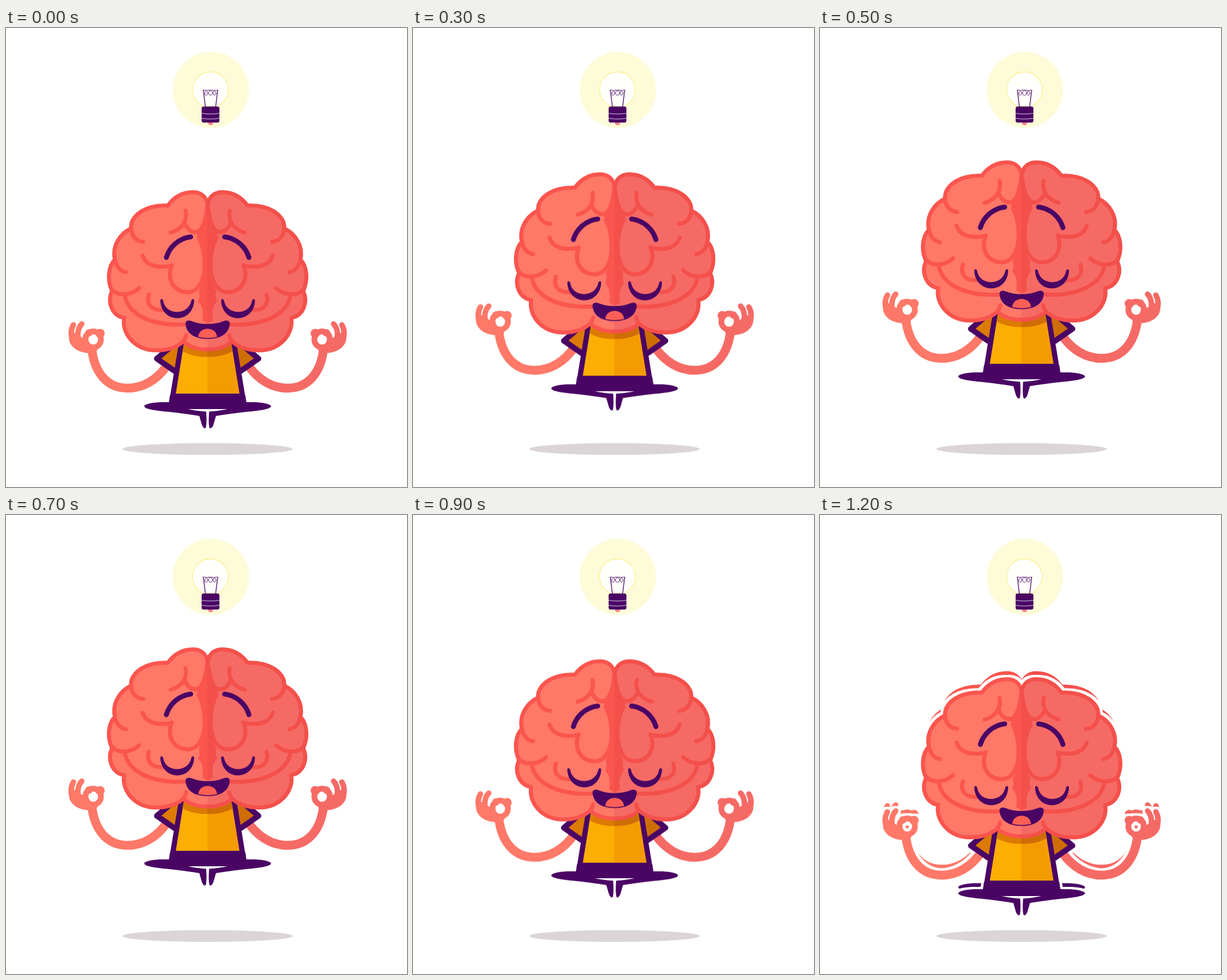
Write an HTML page that moves like this. It is 699 by 801 pixels and loops after 1300 ms.

```html
<!DOCTYPE html>
<html lang="en">
<head>
<meta charset="utf-8">
<title>Meditating brain</title>
<style>
  html, body { margin: 0; width: 100%; height: 100%; overflow: hidden; background: #fff; }
  svg { display: block; width: 699px; height: 801px; }

  .left  { --skin: #ff7868; --line: #fa554e; --shirt: #fcae02; --shade: #dc7a02; }
  .right { --skin: #f66a65; --line: #f4504b; --shirt: #f59b02; --shade: #cf6d05; }

  .skin  { fill: var(--skin); }
  .limb  { fill: none; stroke: var(--skin); stroke-linecap: round; }
  .fold  { fill: none; stroke: var(--line); stroke-width: 7; stroke-linecap: round; stroke-linejoin: round; }
  .ink   { fill: #4a0564; }
  .inkline { fill: none; stroke: #4a0564; stroke-linecap: round; stroke-linejoin: round; }

  /* 13 held poses of 100 ms: seven up, six down */
  .float { animation: float 1300ms infinite; }
  @keyframes float {
    0%       { transform: translateY(0); animation-timing-function: steps(7, end); }
    53.8461% { transform: translateY(-72.8px); animation-timing-function: step-end; }
    53.8462% { transform: translateY(-52px); animation-timing-function: steps(6, end); }
    100%     { transform: translateY(10.4px); }
  }

  /* trace of the previous pose, seen only while the last one is held */
  .trace { opacity: 0; animation: trace 1300ms step-end infinite; }
  @keyframes trace {
    0%       { opacity: 0; }
    92.3077% { opacity: 1; }
    100%     { opacity: 1; }
  }
</style>
</head>
<body>
<svg viewBox="0 0 699 801" xmlns="http://www.w3.org/2000/svg">
  <defs>
    <filter id="halo" filterUnits="userSpaceOnUse" x="90" y="260" width="520" height="460" color-interpolation-filters="sRGB">
      <feMorphology in="SourceAlpha" operator="dilate" radius="4" result="grown"/>
      <feFlood flood-color="#fff"/>
      <feComposite in2="grown" operator="in"/>
    </filter>

    <path id="lobes" d="M352 313C351 298 343 286.500 326 286.500C304 286.500 290 299 282 310C262 309 246 314 236 320C224 328 217 338 218 350C200 358 184 380 190 404C178 416 176 440 185 459C176 477 184 502 206 506C201 530 222 562.500 262 562.500C284 562.500 298 557 309 547Q324 561 352 561"/>

    <g id="halfBody">
      <!-- arm and hand -->
      <path class="limb" stroke-width="15.5" d="M149.500 560C154 600 175 628.500 212 628.500C239 628.500 263 614 280 590"/>
      <path class="limb" stroke-width="9.500" d="M117.500 518C113 526 112 537 118 549"/>
      <path class="limb" stroke-width="9.500" d="M132 516.500C125 524 124 536 127 548"/>
      <path class="skin" d="M110 536C107 556 126 566 142 567L157 566L162 555L147 554L143 543L139 531C135 532 134 537 134 541L120 532Z"/>
      <ellipse class="limb" cx="152" cy="543.500" rx="13.500" ry="14" stroke-width="10"/>
      <circle class="skin" cx="144.500" cy="532" r="6.500"/>
      <circle class="skin" cx="164" cy="533" r="8"/>
      <!-- shirt -->
      <path d="M290 554L263 577L294 598L306 548Z" fill="var(--shade)"/>
      <path class="inkline" stroke-width="10" d="M290 554L263 577L293 598"/>
      <path class="ink" d="M302 545L284 655H352V545Z"/>
      <path d="M311 545L296 638H352V545Z" fill="var(--shirt)"/>
      <path d="M311 545L308 564Q324 574 352 574V545Z" fill="var(--shade)"/>
      <!-- leg -->
      <path class="ink" d="M284 653H268C252 654 241 657 241 660C241 665 262 668 285 670C303 672 320 674 337 677L341 691C343 698 347 700.500 348.500 697C350 690 349.500 680 349 669.500C338 668.500 326 667 317 665H352V640H286Z"/>
    </g>

    <g id="halfBrain">
      <use class="skin" href="#lobes"/>
      <path d="M352 306C350 335 345 350 332 358C340 372 345 385 346 405C347 435 343 450 336 459C338 465 338 471 335 477C342 484 345 495 342 510L352 516Z" fill="var(--line)"/>
      <g class="fold">
        <use href="#lobes"/>
        <path d="M313 319C317 338 305 352 287 357M312 342C318 355 328 358 335 355C344 350 348 335 351 312"/>
        <path d="M218 348C218 362 226 372 239 373"/>
        <path d="M238 397C243 413 260 420 288 415"/>
        <path d="M289 414C280 436 290 461 318 461C340 459 348 432 346 405C345 390 341 375 336 366"/>
        <path d="M189 398C190 413 197 424 209 426"/>
        <path d="M184 456C194 468 217 468 232 454"/>
        <path d="M207 466C212 500 255 521 314 517"/>
        <path d="M249 465C244 481 253 493 272 492"/>
        <path d="M309 547Q313 542 314 536"/>
      </g>
      <path class="inkline" stroke-width="8.500" d="M279.500 400.500C285 382 301 367 322 364.500"/>
      <path class="ink" d="M269 476C269 472 273 472 274 476C278 502 318 502 323 476C324 472 328 472 328 476C326 517 271 516 269 476Z"/>
    </g>

    <g id="guy">
      <use class="left" href="#halfBody"/>
      <use class="right" href="#halfBody" transform="matrix(-1 0 0 1 703 0)"/>
      <use class="left" href="#halfBrain"/>
      <use class="right" href="#halfBrain" transform="matrix(-1 0 0 1 703 0)"/>
      <path class="ink" d="M313 517C312 510 319 509 325 512C340 518 363 518 378 512C384 509 391 510 390 517C388 535 372 542.500 351.500 542.500C331 542.500 315 535 313 517Z"/>
      <path d="M335 539C337 520 366 520 368 539Q352 543 335 539Z" fill="#fb5f55"/>
    </g>
  </defs>

  <!-- light bulb -->
  <circle cx="357" cy="108" r="66.500" fill="#fefbd8"/>
  <path d="M341 137V134.500A31 31 0 1 1 371.500 134.500V137Z" fill="#fffffc" stroke="#fbf18f" stroke-width="1.300"/>
  <path class="inkline" stroke-width="1.300" d="M347.500 137L344 108.500M365.500 137L369 108.500"/>
  <path class="inkline" stroke-width=".9" d="M344 108.500C350 107 353 112 351 116C349 119 345 117 347 112C349 107 359 107 360 112C360 119 353 119 353 113C354 107 363 107 366 112C367 118 361 119 361 114C361 109 365 108 369 108.500"/>
  <ellipse cx="356.500" cy="165.500" rx="4.500" ry="4" fill="#fb7f88"/>
  <rect class="ink" x="341" y="137" width="31" height="28" rx="3.500"/>
  <path d="M341 149Q356 151 372 149M341 157.500Q356 160 372 157.500" fill="none" stroke="#a78bb8" stroke-width="1.300"/>

  <ellipse cx="351.300" cy="734.700" rx="148.500" ry="10.300" fill="#dcd5d8"/>

  <g class="trace">
    <use href="#guy" y="-10.400"/>
    <use href="#guy" filter="url(#halo)"/>
  </g>
  <g class="float"><use href="#guy"/></g>
</svg>
</body>
</html>
```
